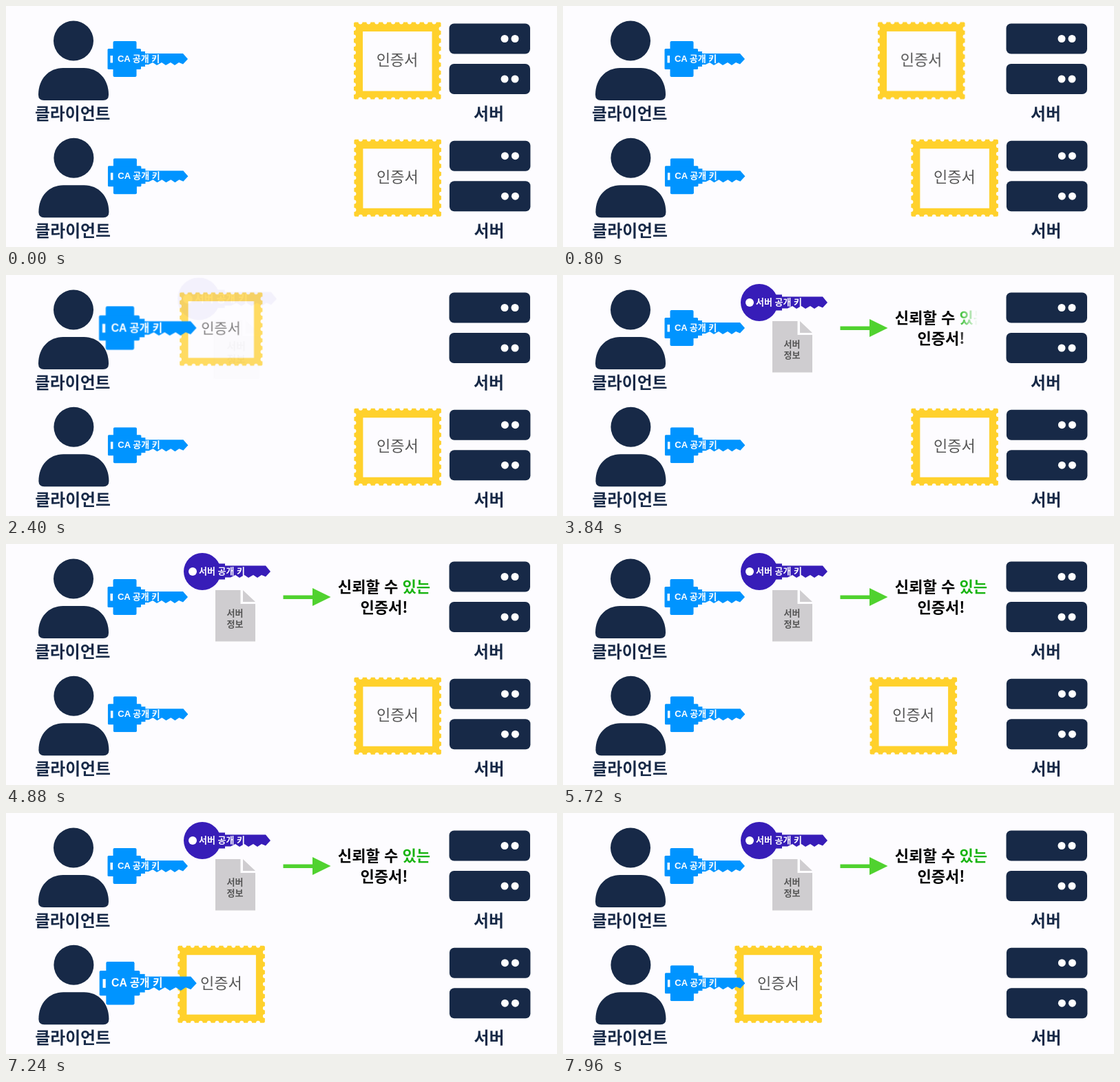
These frames come from a looping animation (800x350 px, 8 s). An HTML page:

```html
<!DOCTYPE html>
<html lang="ko">
<head>
<meta charset="utf-8">
<title>인증서 검증</title>
<style>
  html, body { margin: 0; width: 100%; height: 100%; overflow: hidden; background: #fdfcff; }
  svg { display: block; width: 800px; height: 350px; }
  text { font-family: "Noto Sans CJK KR", "Noto Sans CJK", sans-serif; font-weight: 700; text-anchor: middle; }
  .label { font-size: 23.8px; fill: #172947; }
  .key-label { font: 700 13px "Liberation Sans", "Noto Sans CJK KR", "Noto Sans CJK", sans-serif; fill: #fff; }
  .cert-label { font-size: 22px; font-weight: 400; fill: #555; }
  .doc-label { font-size: 13px; fill: #555; }
  .verdict { font-size: 22.1px; fill: #000; }
  .trusted { fill: #18b410; }
  .holes { stroke: #fdfcff; stroke-width: 6; stroke-linecap: round; }

  /* The easing applies to each keyframe segment. */
  .anim { animation: 8s cubic-bezier(.37, 0, .63, 1) infinite; }
  .send1 { animation-name: send1; }
  .send2 { animation-name: send2; }
  .open { animation-name: open; transform-origin: 312px 78.5px; }
  .pulse1 { animation-name: pulse1; transform-origin: 205.5px 77px; }
  .pulse2 { animation-name: pulse2; transform-origin: 205.5px 77px; }
  .reveal { animation-name: reveal; transform-origin: 321px 77.5px; }
  .wipe-arrow { animation-name: wipe-arrow; }
  .wipe-text { animation-name: wipe-text; }

  @keyframes send1 {
    0%, 6.43% { transform: none; }
    18.93%, 100% { transform: translate(-256px, -1px); }
  }
  @keyframes send2 {
    0%, 67.48% { transform: none; }
    79.98%, 100% { transform: translate(-256px, -1px); }
  }
  @keyframes open {
    0%, 27.5% { transform: none; opacity: 1; }
    35%, 100% { transform: scale(.8); opacity: 0; }
  }
  @keyframes pulse1 {
    0%, 23.75%, 36.25%, 100% { transform: scale(1); }
    30% { transform: scale(1.215); }
  }
  @keyframes pulse2 {
    0%, 84.8%, 97.3%, 100% { transform: scale(1); }
    91.05% { transform: scale(1.215); }
  }
  @keyframes reveal {
    0%, 28.75% { transform: scale(1.15); opacity: 0; }
    37.5%, 100% { transform: none; opacity: 1; }
  }
  @keyframes wipe-arrow {
    0%, 37.5% { transform: translateX(400px); }
    43%, 100% { transform: translateX(505px); }
  }
  @keyframes wipe-text {
    0%, 42.5% { transform: translateX(480px); }
    51.1%, 100% { transform: translateX(650px); }
  }
</style>
</head>
<body>
<svg viewBox="0 0 800 350">
  <defs>
    <linearGradient id="soft" gradientUnits="userSpaceOnUse" x1="-30" x2="0" y1="0" y2="0">
      <stop offset="0" stop-color="#fff"/>
      <stop offset="1" stop-color="#fff" stop-opacity="0"/>
    </linearGradient>
    <mask id="arrow-mask" maskUnits="userSpaceOnUse" x="0" y="0" width="800" height="350">
      <rect class="anim wipe-arrow" x="-400" width="400" height="350" fill="url(#soft)"/>
    </mask>
    <mask id="text-mask" maskUnits="userSpaceOnUse" x="0" y="0" width="800" height="350">
      <rect class="anim wipe-text" x="-400" width="400" height="350" fill="url(#soft)"/>
    </mask>

    <g id="hosts">
      <g fill="#172947">
        <circle cx="98" cy="50.5" r="29"/>
        <path d="M47 129C47 106 62 90 83 90H113C134 90 149 106 149 129Q149 137 141 137H55Q47 137 47 129Z"/>
        <rect x="643.5" y="25.5" width="117.5" height="44" rx="7"/>
        <rect x="643.5" y="84" width="117.5" height="44" rx="7"/>
      </g>
      <g fill="#fff">
        <circle cx="724" cy="47.5" r="5.5"/><circle cx="739" cy="47.5" r="5.5"/>
        <circle cx="724" cy="106" r="5.5"/><circle cx="739" cy="106" r="5.5"/>
      </g>
      <text class="label" x="96.7" y="164.7">클라이언트</text>
      <text class="label" x="701" y="164.7">서버</text>
    </g>

    <g id="cert">
      <rect x="505" y="23.5" width="126.5" height="112" rx="2" fill="#ffd12c"/>
      <path class="holes" stroke-dasharray="0 11.9" d="M514.5 23.5H623M514.5 135.5H623"/>
      <path class="holes" stroke-dasharray="0 11.6" d="M505 33V127M631.5 33V127"/>
      <rect x="518" y="37" width="100.5" height="86.5" fill="#fdfcff"/>
      <text class="cert-label" x="568" y="86">인증서</text>
    </g>

    <g id="ca-key">
      <g fill="#0094ff">
        <rect x="155.5" y="51" width="34" height="52" rx="2"/>
        <rect x="147.5" y="62" width="48.5" height="30" rx="1.5"/>
        <rect x="190" y="66" width="12" height="22"/>
        <path d="M200 69H257L264 77L257 84.5L251 82L245 86L239 82L232 86L226 82L219 86L213 82L207 85H200Z"/>
      </g>
      <rect x="151.5" y="72" width="3.5" height="10.5" fill="#fff"/>
      <text class="key-label" x="192.6" y="81.2">CA 공개 키</text>
    </g>
  </defs>

  <rect width="800" height="350" fill="#fdfcff"/>

  <use href="#hosts"/>
  <g class="anim open"><use class="anim send1" href="#cert"/></g>
  <use class="anim pulse1" href="#ca-key"/>

  <g class="anim reveal">
    <g fill="#371db8">
      <circle cx="285" cy="40" r="27"/>
      <rect x="300" y="28.5" width="18" height="23"/>
      <path d="M300 31.5H377L384 40L377 47.5L371 45L365 49L359 45L352 49L346 45L339 49L333 45L326 48.5H300Z"/>
    </g>
    <circle cx="271" cy="40" r="6" fill="#fff"/>
    <text class="key-label" x="313.5" y="44.3">서버 공개 키</text>
    <path fill="#cfcdd0" d="M304 67H340.5V87H362V141.5H304ZM344 67L362 84H344Z"/>
    <text class="doc-label" x="332.5" y="105">서버</text>
    <text class="doc-label" x="332.5" y="121">정보</text>
  </g>

  <g mask="url(#arrow-mask)">
    <path fill="#50d22f" d="M402.5 74.5H445V64L471.5 77L445 90V80H402.5Z"/>
  </g>
  <g mask="url(#text-mask)">
    <text class="verdict" x="549" y="70">신뢰할 수 <tspan class="trusted">있는</tspan></text>
    <text class="verdict" x="549" y="99.5">인증서!</text>
  </g>

  <g transform="translate(.4 170.2)">
    <use href="#hosts"/>
    <use class="anim send2" href="#cert"/>
    <use class="anim pulse2" href="#ca-key"/>
  </g>
</svg>
</body>
</html>
```
